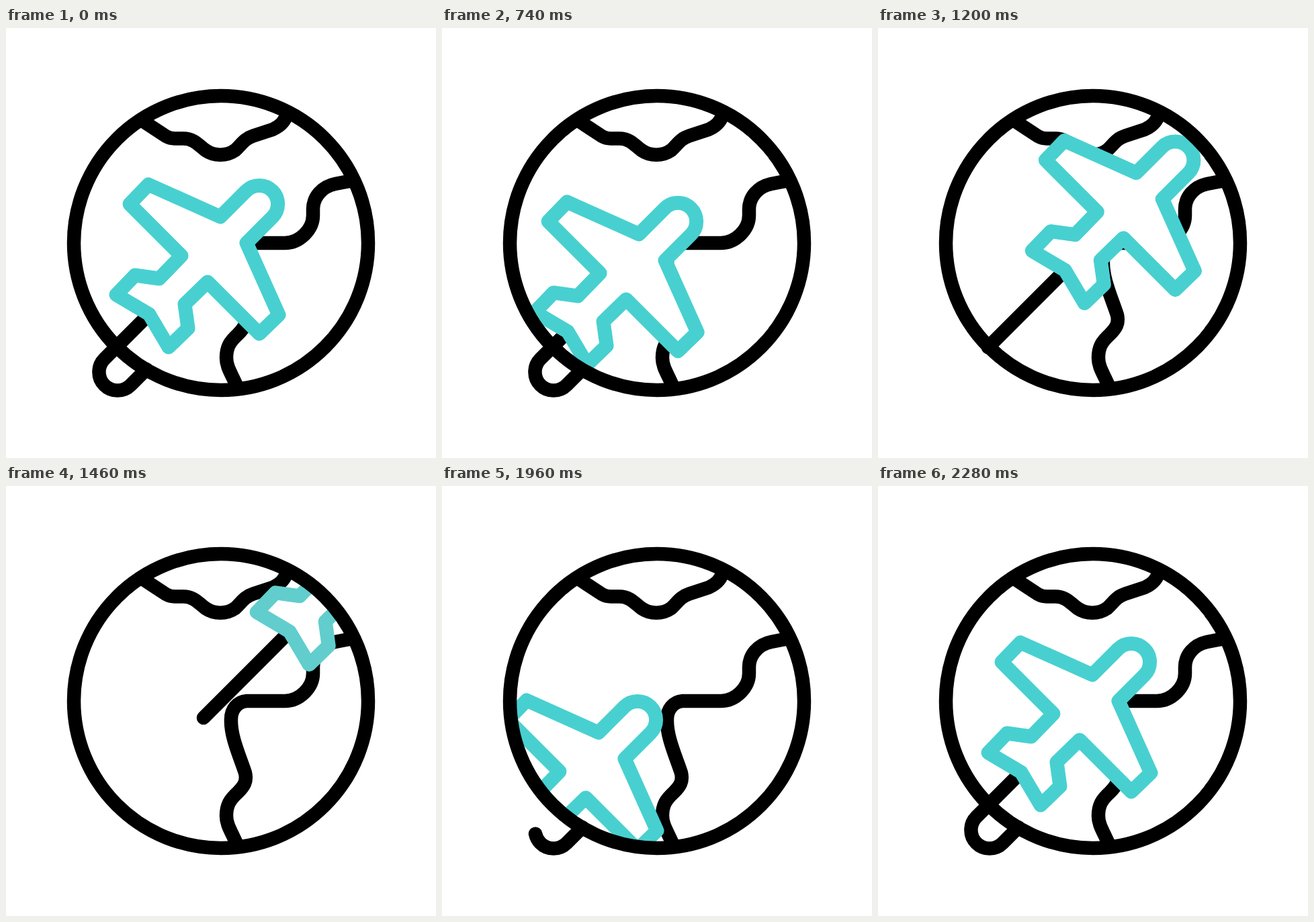
An HTML page that plays this animation: 640 by 640 pixels, repeating every 2.4 s.

```html
<!DOCTYPE html>
<html lang="en">
<head>
<meta charset="utf-8">
<title>Round-the-world flight</title>
<style>
  html, body { margin: 0; width: 100%; height: 100%; overflow: hidden; background: #fff; }
  svg { display: block; width: 100%; height: 100%; }
  .ink { fill: none; stroke: #000; stroke-width: 20.5; stroke-linecap: round; stroke-linejoin: round; }
  .land { stroke-linecap: butt; }
  #plane { fill: #fff; stroke: #48d0d0; stroke-width: 21; stroke-linejoin: round; }
</style>
</head>
<body>
<svg viewBox="0 0 640 640">
  <defs>
    <clipPath id="inside"><circle cx="320" cy="320" r="210"/></clipPath>
  </defs>
  <path class="ink land" d="M203 138L238 161Q244 164.500 251 164.500H264C280 164.500 287 175 297 182C310 191 328 191 341 182C350 174 354 165 368 160.500L397 151C408 146 416 138 418 127"/>
  <path class="ink land" d="M516 227L490 232C470 236 457 252 457 270V279C457 300 437 320 415 320H358C344 321 335 333 335 347C334 372 347 400 356 427C359 440 354 447 345 456C333 467 328 475 328 491C328 505 336 515 343 532"/>
  <path class="ink" id="leaving"/>
  <path class="ink" id="arriving"/>
  <g clip-path="url(#inside)">
    <path id="plane" d="M212 233L319 281L357.500 242.500A27.500 27.500 0 0 1 396.500 281.500L358 320L406 427L377 455L300 378L266 411L271 447L242 475L213 426L164 397L192 368L228 373L261 339L184 262Z"/>
  </g>
  <circle class="ink" cx="320" cy="320" r="219"/>
</svg>
<script>
const LOOP = 2400, STEP = 20;
const TURN = 770, SWAP = 1560, LAND = 2280;
const BACK = 26;
const TRAIL = 'M209 508L185.500 531.500A27.500 27.500 0 0 1 146.500 492.500L474 165';

const $ = id => document.getElementById(id);
const plane = $('plane'), leaving = $('leaving'), arriving = $('arriving');
leaving.setAttribute('d', TRAIL);
arriving.setAttribute('d', TRAIL);
const total = leaving.getTotalLength();
const restHead = total - (474 - 213) * Math.SQRT2;

// Plane offset along the rising diagonal: pull back, dash off, glide in.
function offset(t) {
  if (t < TURN) return -BACK * (1 - Math.cos(Math.PI * t / TURN)) / 2;
  if (t < SWAP) return -BACK + 0.000494 * (t - TURN) ** 2;
  return -153 * (Math.max(0, LAND - t) / 500) ** 1.29;
}

function trim(path, from, to) {
  const a = Math.max(0, from), b = Math.min(total, to);
  const shown = b > a;
  path.style.display = shown ? '' : 'none';
  if (!shown) return;
  path.setAttribute('stroke-dasharray', `${b - a} 9999`);
  path.setAttribute('stroke-dashoffset', -a);
}

function draw(t) {
  const d = offset(t);
  const head = restHead + d * Math.SQRT2;
  const tail = 144 + 0.708 * (t - 1200);
  plane.setAttribute('transform', `translate(${d} ${-d})`);
  plane.style.stroke = d > 140 || d < -110 ? '#62cdcd' : '#48d0d0';
  trim(leaving, tail, t < SWAP ? head : total);
  trim(arriving, 0, t < SWAP ? 0 : head);
}

const start = performance.now();
function tick() {
  const t = (performance.now() - start) % LOOP;
  draw(Math.floor(t / STEP) * STEP);
  requestAnimationFrame(tick);
}
tick();
</script>
</body>
</html>
```
